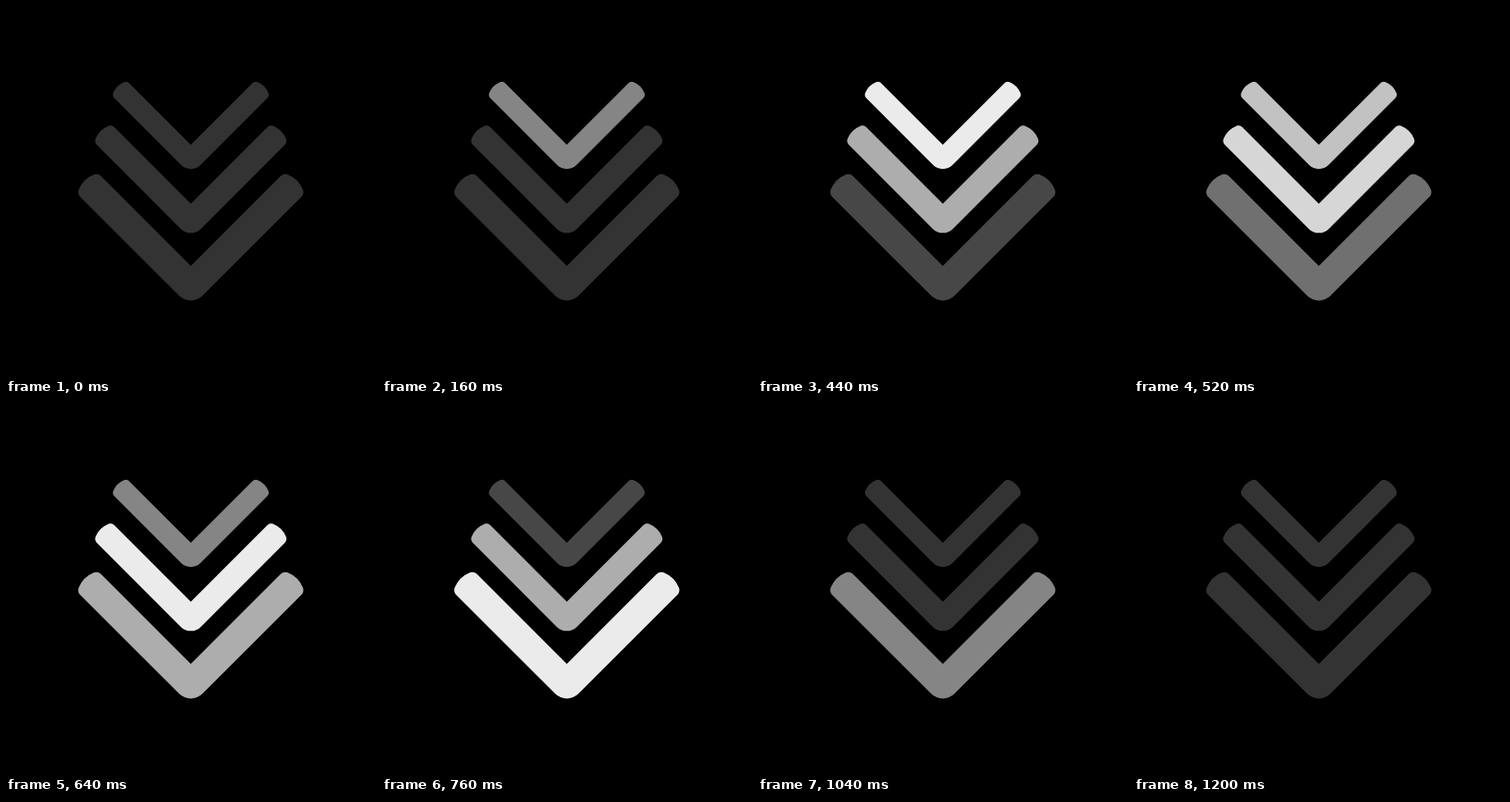
Recreate the animation shown at these times as an HTML page. Size 400 by 400 pixels, loop 1240 ms.

```html
<!DOCTYPE html>
<html lang="en">
<head>
<meta charset="utf-8">
<title>Scroll down chevrons</title>
<style>
  html, body { margin: 0; height: 100%; overflow: hidden; background: #000; }
  svg { display: block; width: 100%; height: 100%; }
</style>
</head>
<body>
<svg viewBox="0 0 400 400" fill="#fff"></svg>
<script>
const svg = document.querySelector('svg');
const CENTER = 199.8, LOOP = 1240, STEP = 40, RAMP = 400, STAGGER = 200;

// One half of an arm's end cap, for an arm 44 units thick; the other half swaps x and y.
const CAP = [[24.2, 2.2], [22.2, 0.2], [19.2, -0.3], [16.7, 0.7]];

function chevron(left, innerY, thickness, radius) {
  const k = thickness / 44;
  const top = left + thickness / 2 + innerY - CENTER;
  const swapped = CAP.map(([x, y]) => [y, x]).reverse();
  const arm = [...CAP, [5.3, 5.3], ...swapped].map(([x, y]) => [left + x * k, top + y * k]);
  const inset = radius * Math.SQRT1_2;
  arm.push([CENTER - inset, innerY + thickness - inset]);

  const l = arm.map(p => p.join(' '));
  const r = arm.map(([x, y]) => `${2 * CENTER - x} ${y}`);
  const path = document.createElementNS('http://www.w3.org/2000/svg', 'path');
  path.setAttribute('d', `M${CENTER} ${innerY} L${l[0]} C${l[1]} ${l[2]} ${l[3]} Q${l[4]} ${l[5]}
    C${l[6]} ${l[7]} ${l[8]} L${l[9]} A${radius} ${radius} 0 0 0 ${r[9]} L${r[8]}
    C${r[7]} ${r[6]} ${r[5]} Q${r[4]} ${r[3]} C${r[2]} ${r[1]} ${r[0]} Z`);
  return svg.appendChild(path);
}

const chevrons = [
  chevron(115.4, 150, 32.4, 15),
  chevron(96.2, 213.7, 38, 15.3),
  chevron(77.9, 280.9, 44.9, 17.7)
];

function draw(now) {
  const time = Math.floor(now % LOOP / STEP) * STEP;
  chevrons.forEach((path, i) => {
    const peak = RAMP + i * STAGGER;
    const glow = Math.max(0, 1 - Math.abs(time - peak) / RAMP);
    path.setAttribute('fill-opacity', 0.2 + 0.8 * glow);
  });
}

const start = performance.now();
function tick() {
  draw(performance.now() - start);
  requestAnimationFrame(tick);
}
tick();
</script>
</body>
</html>
```
